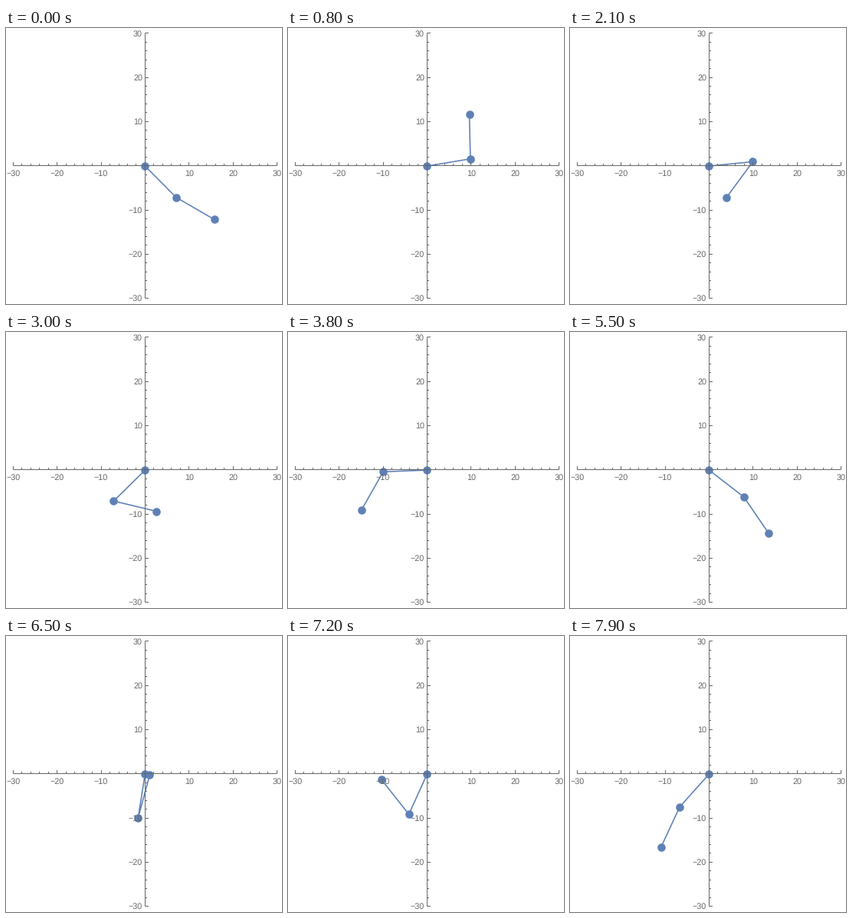
A matplotlib script for the animation above (8000 ms loop, 360 by 358 pixels).

```python
import numpy as np
import matplotlib.pyplot as plt
from matplotlib.animation import FuncAnimation

W, H, DPI = 360, 358, 100
FRAMES, INTERVAL = 80, 100
PT = 72 / DPI
X0, Y0, UNIT = 181.4, 178.7, 5.733
ARM = 10 * UNIT
BLUE, GRAY = "#5e81b5", "#666666"

# Key poses of the pendulum: time in s, both arm angles in degrees from straight down
FIRM = [(0, 45, 60), (0.8, 99.5, 181.5), (2.1, 95.7, 323.5), (3, -45.6, 436.5),
        (4.6, 5.7, 245), (6.5, -9, 524.7), (7.9, -42, 695)]
LOOSE = [(0.2, 51.5, 104), (0.9, 107, 196), (1.8, 111, 268), (2.7, -5, 434),
         (3.6, -93, 368), (5.4, 63, 370), (6.3, 1, 513), (7.2, -27, 577)]

STEP = 0.05
N = 2 * (FRAMES - 1) + 1
PRIOR = np.array([3.5, 0.45, 0.2, 0.2, 0])  # gravity, outer mass share, frictions
SPREAD = 0.4 * np.ones(5)

poses = np.array(sorted(FIRM + LOOSE))
nodes = np.rint(poses[:, 0] / STEP).astype(int)
angles = np.radians(poses[:, 1:]).T
held = np.concatenate([nodes, nodes + N])
slack = np.tile([0.005 if tuple(p) in FIRM else 0.06 for p in poses], 2)


def rates(q):
    vel = (q[..., 2:] - q[..., :-2]) / (2 * STEP)
    acc = (q[..., 2:] - 2 * q[..., 1:-1] + q[..., :-2]) / STEP ** 2
    return q[..., 1:-1], vel, acc


def defects(x):
    """How far a path is from a damped double pendulum."""
    g, m, f1, f2, f3 = (x[..., 2 * N + i, None] for i in range(5))
    a, va, aa = rates(x[..., :N])
    b, vb, ab = rates(x[..., N:2 * N])
    c, s = np.cos(a - b), np.sin(a - b)
    joint = f3 * (vb - va)
    inner = aa + m * (c * ab + s * vb ** 2 - joint) + g * np.sin(a) + f1 * va
    outer = ab + c * aa - s * va ** 2 + g * np.sin(b) + f2 * vb + joint
    return np.concatenate([inner, outer], axis=-1)


def residual(x, sigma):
    return np.concatenate([
        defects(x) / sigma,
        (x[..., held] - angles.ravel()) / slack,
        (x[..., 2 * N:] - PRIOR) / SPREAD,
    ], axis=-1)


def solve_path():
    """Levenberg-Marquardt from straight tweens to a swing through the key poses."""
    tweens = [np.interp(np.arange(N), nodes, q) for q in angles]
    x = np.concatenate(tweens + [PRIOR])
    eye, eps = np.eye(x.size), 1e-6
    for sigma in (3, 1, 0.4):
        damp = 1.0
        r = residual(x, sigma)
        for _ in range(13):
            jac = (residual(x + eps * eye, sigma) - r).T / eps
            lhs = np.vstack([jac, np.sqrt(damp) * eye])
            rhs = np.concatenate([-r, np.zeros(x.size)])
            trial = x + np.linalg.lstsq(lhs, rhs, rcond=None)[0]
            r_new = residual(trial, sigma)
            if r_new @ r_new < r @ r:
                x, r, damp = trial, r_new, damp * 0.2
            else:
                damp *= 6
    return x[:N:2], x[N:2 * N:2]


def pixel(v):
    return np.floor(v) + 0.5


def draw_axes(ax):
    style = dict(color=GRAY, lw=PT, zorder=5, snap=False)
    text = dict(color=GRAY, fontsize=10.7 * PT, family="Liberation Sans", zorder=6)
    cx, cy, reach = pixel(X0), pixel(Y0), 30 * UNIT
    ax.hlines(cy, X0 - reach, X0 + reach, **style)
    ax.vlines(cx, Y0 - reach, Y0 + reach, **style)
    for v in range(-30, 31, 2):
        if v == 0:
            continue
        major = v % 10 == 0
        size = 4.5 if major else 2.5
        x, y = X0 + v * UNIT, Y0 - v * UNIT
        ax.vlines(pixel(x), cy - size, cy, **style)
        ax.hlines(pixel(y), cx, cx + size, **style)
        if major:
            label = str(v).replace("-", "\u2212")
            ax.text(x, 191.8, label, ha="center", va="baseline", **text)
            ax.text(178, y + 3.7, label, ha="right", va="baseline", **text)


plt.rcParams["text.hinting"] = "none"
fig = plt.figure(figsize=(W / DPI, H / DPI), dpi=DPI, facecolor="white")
ax = fig.add_axes([0, 0, 1, 1])
ax.set(xlim=(0, W), ylim=(H, 0))
ax.axis("off")
draw_axes(ax)

theta = np.array(solve_path())
arms, = ax.plot([], [], "-o", color=BLUE, lw=1.6 * PT, ms=10.6 * PT,
                mew=0, zorder=2, snap=False)


def update(i):
    xs = X0 + ARM * np.cumsum([0, *np.sin(theta[:, i])])
    ys = Y0 + 0.4 + ARM * np.cumsum([0, *np.cos(theta[:, i])])
    arms.set_data(xs, ys)
    return arms,


anim = FuncAnimation(fig, update, frames=FRAMES, interval=INTERVAL,
                     repeat=True, repeat_delay=0)
plt.show()
```
